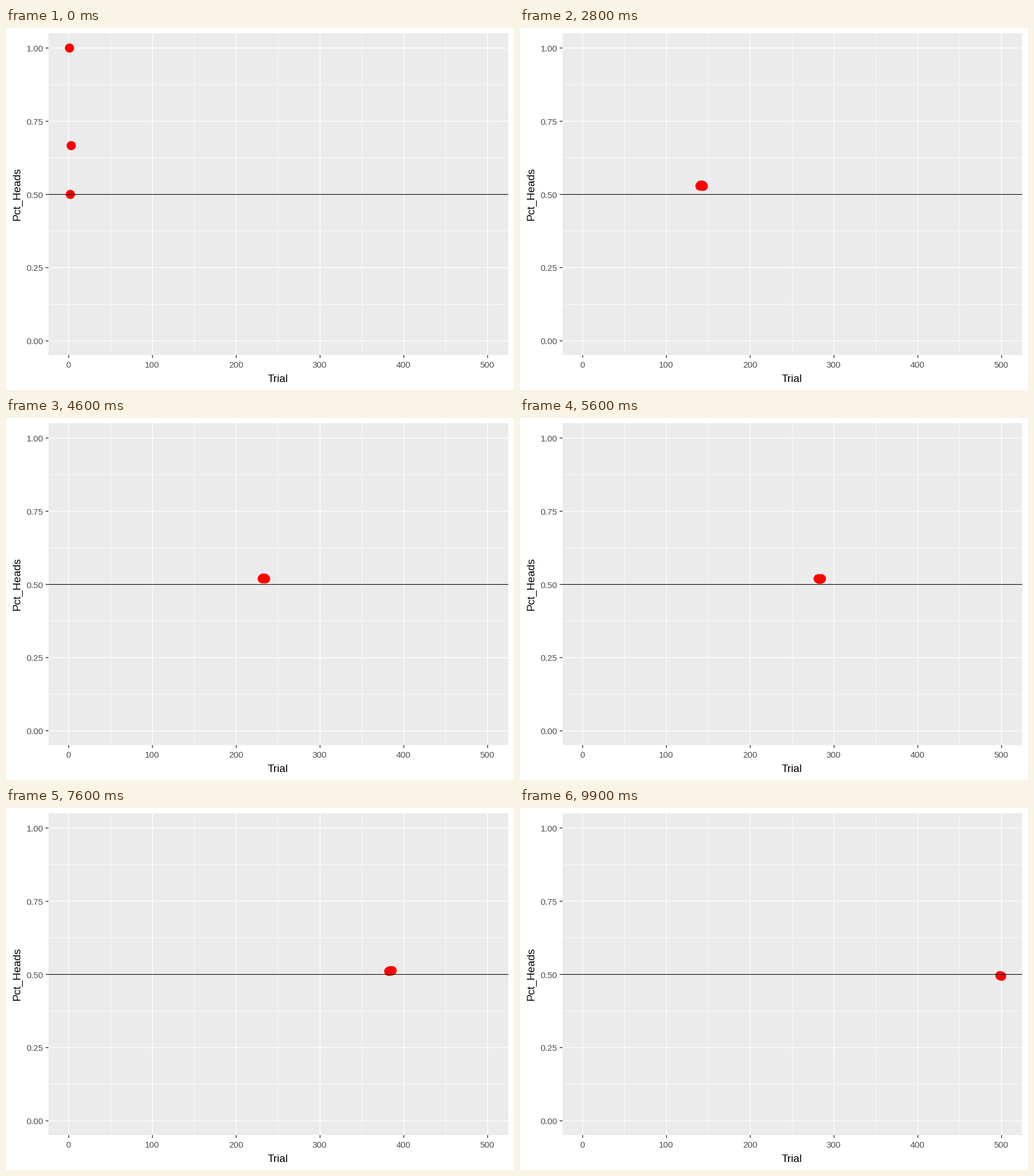
Animation of 885x632 px, one loop 10 s. Source, as a matplotlib script:

```python
import matplotlib.pyplot as plt
import numpy as np
from matplotlib.animation import FuncAnimation
from matplotlib.patches import Circle, Rectangle

W, H, DPI = 885, 632, 100
TRIALS, FRAMES = 500, 100
LEFT, TOP, RIGHT, BOTTOM = 74, 9, 875, 571
TICK = 5

plt.rcParams["font.family"] = "Liberation Sans"

# Heads counted so far at the main turns of the walk; even runs in between
turn_trial = [1, 3, 40, 57, 74, 110, 142, 166, 224, 232, 255, 317, 332, 365,
              395, 434, 443, 498]
turn_heads = [1, 2, 19, 29, 35, 60, 75, 91, 116, 121, 130, 167, 174, 184,
              204, 217, 224, 247]

trial = np.arange(1, TRIALS + 1)
heads = np.ceil(np.interp(trial, turn_trial, turn_heads) - 0.5)
share = heads / trial
shown_at = np.round((trial - 1) * (FRAMES - 1) / (TRIALS - 1)).astype(int)


def px(t):
    return 109.2 + 1.4597 * t


def py(p):
    return 9.4 + (1.05 - p) * 511.2


fig = plt.figure(figsize=(W / DPI, H / DPI), dpi=DPI, facecolor="white")
ax = fig.add_axes([0, 0, 1, 1])
ax.set_xlim(0, W)
ax.set_ylim(H, 0)
ax.axis("off")


def box(x, y, w, h, color, z):
    ax.add_patch(Rectangle((x, y), w, h, facecolor=color, linewidth=0,
                           snap=False, zorder=z))


def vline(x, y0, y1, width, color="white", z=1):
    box(x - width / 2, y0, width, y1 - y0, color, z)


def hline(y, x0, x1, width, color="white", z=1):
    box(x0, y - width / 2, x1 - x0, width, color, z)


def label(x, y, text, size, color, **kw):
    ax.text(x, y, text, fontsize=size * 72 / DPI, color=color, zorder=6, **kw)


box(LEFT, TOP, RIGHT - LEFT, BOTTOM - TOP, "#EBEBEB", 0)

for t in range(50, 500, 100):
    vline(px(t), TOP, BOTTOM, 0.7)
for p in np.arange(0.125, 1, 0.25):
    hline(py(p), LEFT, RIGHT, 0.7)

for t in range(0, 501, 100):
    vline(px(t), TOP, BOTTOM, 1.4)
    vline(px(t), BOTTOM, BOTTOM + TICK, 1.4, "#333333")
    label(px(t) - 0.7, 593, str(t), 15, "#4D4D4D", ha="center",
          va="baseline")
for p in np.arange(0, 1.01, 0.25):
    hline(py(p), LEFT, RIGHT, 1.4)
    hline(py(p), LEFT - TICK, LEFT, 1.4, "#333333")
    label(65, round(py(p)) + 6, f"{p:.2f}", 15, "#4D4D4D", ha="right",
          va="baseline")

hline(py(0.5), LEFT, RIGHT, 1.1, "black", 5)
label(474, 618, "Trial", 19, "black", ha="center", va="baseline")
label(29, 290, "Pct_Heads", 19, "black", rotation=90, ha="right",
      va="center")

dots = [ax.add_patch(Circle((0, 0), 8, facecolor="red", linewidth=0,
                            zorder=4))
        for _ in range(np.bincount(shown_at).max())]


def draw(i):
    now = np.flatnonzero(shown_at == i)
    for k, dot in enumerate(dots):
        dot.set_visible(k < len(now))
        if k < len(now):
            n = now[k]
            dot.center = px(trial[n]), py(share[n])
    return dots


anim = FuncAnimation(fig, draw, frames=FRAMES, interval=100, repeat=True,
                     repeat_delay=0, init_func=lambda: draw(0))
plt.show()
```
